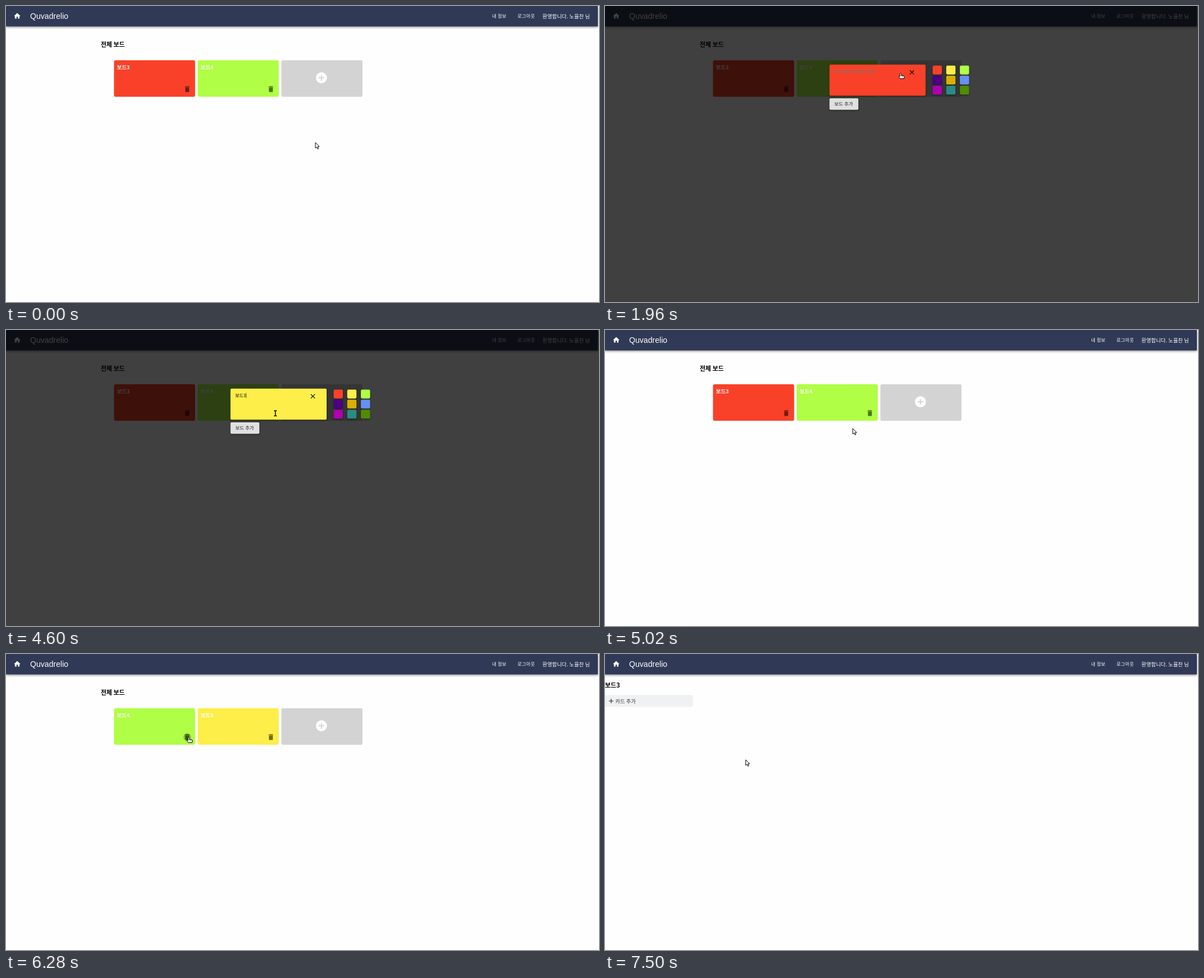
These frames come from a looping animation (1058 px wide and 529 px high, 7.52 s). An HTML page with a canvas:

```html
<!DOCTYPE html>
<html lang="ko">
<head>
<meta charset="utf-8">
<title>Boards</title>
<style>
html, body { margin: 0; width: 100%; height: 100%; overflow: hidden; background: #fefefe; }
canvas { display: block; width: 1058px; height: 529px; }
</style>
</head>
<body>
<canvas id="stage" width="1058" height="529"></canvas>
<script>
const ctx = document.getElementById('stage').getContext('2d');
const LOOP = 7520;
const KR = '"Noto Sans CJK KR", "Noto Sans CJK JP", "Noto Sans CJK", sans-serif';
const UNIT = 0.588; // page zoom

const RED = '#f94129', LIME = '#b0fe45', YELLOW = '#fdee49', GREY = '#d3d3d3';
const SWATCHES = [RED, YELLOW, LIME, '#4b0082', '#d9af02', '#6690f2', '#b000b0', '#288c84', '#4f8c00'];
const PANEL = [400.5, 104.7, 171.5, 55.5];
const ADD = [400.5, 165, 51.5, 20.5];

const ICONS = {
  home: 'M10 20v-6h4v6h5v-8h3L12 3 2 12h3v8z',
  trash: 'M6 19c0 1.1.9 2 2 2h8c1.1 0 2-.9 2-2V7H6v12zM19 4h-3.5l-1-1h-5l-1 1H5v2h14V4z',
  close: 'M19 6.41 17.59 5 12 10.59 6.41 5 5 6.41 10.59 12 5 17.59 6.41 19 12 13.41 17.59 19 19 17.59 13.41 12z',
  plus: 'M19 13h-6v6h-2v-6H5v-2h6V5h2v6h6v2z',
  addCircle: 'M12 2C6.48 2 2 6.48 2 12s4.48 10 10 10 10-4.48 10-10S17.52 2 12 2zm5 11h-4v4h-2v-4H7v-2h4V7h2v4h4v2z'
};
const CURSORS = {
  arrow: new Path2D('M0 0V10L2.4 8 4.1 11.6 5.7 10.9 4.1 7.4 7 7.2Z'),
  hand: new Path2D('M-1.2 1Q0-.8 1.2 1V4L6 5Q6.8 5.3 6.6 6.5L6 9.8H-.6L-3.4 6.5Q-3.6 5-1.2 6Z'),
  beam: new Path2D('M-2.5-4.6H-.8L0-4 .8-4.6H2.5M0-4V4M-2.5 4.6H-.8L0 4 .8 4.6H2.5')
};

// start, end, target x y, bend x y
const MOVES = [
  [20, 740, 237, 123, 480, 290],
  [800, 840, 236.5, 121.5, 236.7, 122],
  [1160, 1280, 527.5, 120, 380, 112],
  [2280, 2700, 617, 112, 580, 132],
  [3040, 3240, 523.5, 117.5, 570, 125],
  [4520, 4680, 442, 176, 480, 150],
  [5060, 5640, 326, 148.5, 350, 125],
  [6660, 7120, 380, 128, 340, 262],
  [7300, 7480, 251, 189, 330, 150]
];
const TYPED = [[3880, 'ㅂ'], [3960, '보'], [4060, '볻'], [4140, '보드'], [4320, '보드3']];

const clamp = v => Math.max(0, Math.min(1, v));
const smooth = v => v * v * (3 - 2 * v);
const ramp = (t, a, b) => smooth(clamp((t - a) / (b - a)));
const inside = (p, [x, y, w, h]) => p.x >= x && p.x <= x + w && p.y >= y && p.y <= y + h;
const cardRect = i => [192.7 + i * 149.3, 97, 144.7, 65.3];
const swatchRect = i => [584.5 + (i % 3) * 24.3, 106.6 + Math.floor(i / 3) * 17.9, 16.5, 15.8];

function box([x, y, w, h], r, fill, shadow) {
  ctx.save();
  if (shadow) {
    ctx.shadowColor = `rgba(0,0,0,${shadow})`;
    ctx.shadowBlur = 3;
    ctx.shadowOffsetY = 1.5;
  }
  ctx.fillStyle = fill;
  ctx.beginPath();
  ctx.roundRect(x, y, w, h, r);
  ctx.fill();
  ctx.restore();
}

function disc(x, y, r, fill) {
  ctx.fillStyle = fill;
  ctx.beginPath();
  ctx.arc(x, y, r, 0, Math.PI * 2);
  ctx.fill();
}

// cy is the visual middle of the line
function text(str, x, cy, size, color, { weight = 400, family = KR, spacing = 0 } = {}) {
  ctx.font = `${weight} ${size}px ${family}`;
  ctx.letterSpacing = spacing + 'px';
  ctx.fillStyle = color;
  ctx.fillText(str, x, cy + size * 0.37);
  return ctx.measureText(str).width;
}

function icon(name, cx, cy, color, scale = UNIT) {
  ctx.save();
  ctx.translate(cx, cy);
  ctx.scale(scale, scale);
  ctx.translate(-12, -12);
  ctx.fillStyle = color;
  ctx.fill(new Path2D(ICONS[name]));
  ctx.restore();
}

function pointerAt(t) {
  let x = 552, y = 244;
  for (const [a, b, tx, ty, bx, by] of MOVES) {
    if (t < a) break;
    const u = ramp(t, a, b), v = 1 - u;
    x = v * v * x + 2 * u * v * bx + u * u * tx;
    y = v * v * y + 2 * u * v * by + u * u * ty;
  }
  return { x, y };
}

function boardsAt(t) {
  const red = ['보드3', RED], lime = ['보드4', LIME], yellow = ['보드3', YELLOW];
  if (t < 5060) return [red, lime];
  return t < 6260 ? [red, lime, yellow] : [lime, yellow];
}

function cursorKind(t, p, cards) {
  if (t >= 7280) return t < 7320 ? 'hand' : 'arrow';
  if (t >= 1460 && t < 4740) {
    if (t < 2280) return 'hand';
    if (SWATCHES.some((_, i) => inside(p, swatchRect(i))) || inside(p, ADD)) return 'hand';
    return inside(p, PANEL) ? 'beam' : 'arrow';
  }
  for (let i = 0; i <= cards; i++) if (inside(p, cardRect(i))) return 'hand';
  return 'arrow';
}

function drawHeader() {
  ctx.save();
  ctx.shadowColor = 'rgba(0,0,0,.45)';
  ctx.shadowBlur = 4;
  ctx.shadowOffsetY = 1.5;
  ctx.fillStyle = '#303955';
  ctx.fillRect(0, 0, 1056, 36.5);
  ctx.restore();
  icon('home', 20, 17.9, '#fff');
  text('Quvadrelio', 43, 17.5, 14.1, '#fff', { family: '"Liberation Sans", Arial, sans-serif' });
  text('내 정보', 867.3, 18, 8.23, '#fff', { weight: 500, spacing: 0.235 });
  text('로그아웃', 912.5, 18, 8.23, '#fff', { weight: 500, spacing: 0.235 });
  text('환영합니다. 노율찬 님', 957, 18.5, 9.41, '#fff');
}

function drawBoards(t, p, boards) {
  text('전체 보드', 169, 68.5, 11, '#000', { weight: 700 });
  const live = t < 1460 || (t > 4920 && t < 6260) || t > 6660;
  for (let i = 0; i <= boards.length; i++) {
    const rect = cardRect(i), [x, y, w, h] = rect;
    if (i < boards.length) {
      const [name, color] = boards[i];
      box(rect, 3, color);
      text(name, x + 5.3, y + 12.4, 9.41, '#fff', { weight: 700 });
      if (i === 0 && t >= 6180 && t < 6520) {
        const grow = 3 + 3.7 * ramp(t, 6180, 6270);
        disc(x + 130.6, y + 51.5, grow, `rgba(0,0,0,${0.26 * (1 - ramp(t, 6320, 6520))})`);
      }
      icon('trash', x + 130.6, y + 51.5, 'rgba(0,0,0,.54)');
    } else {
      box(rect, 3, GREY);
      icon('addCircle', x + w / 2 - 0.9, y + 31.3, '#fff', 0.98);
    }
    if (live && inside(p, rect)) box(rect, 3, 'rgba(254,254,254,.3)');
  }
}

function drawTooltip() {
  box([241.5, 131, 31, 19], 0, '#d8d8d8', 0.4);
  box([242.5, 132, 29, 17], 0, '#000');
  text('보드3', 246.7, 140.7, 8.4, '#fff');
}

function drawModal(t, alpha) {
  ctx.save();
  ctx.globalAlpha = alpha;
  ctx.fillStyle = 'rgba(0,0,0,.75)';
  ctx.fillRect(0, 0, 1058, 529);

  box(PANEL, 2, t < 2860 ? RED : YELLOW, 0.3);
  let typed = '';
  for (const [at, str] of TYPED) if (t >= at) typed = str;
  let width = 0;
  if (typed) width = text(typed, 409, 117, 7.84, '#000');
  else text('보드명을 입력해주세요.', 409, 117, 7.84, '#757575');
  if (t >= 3440) {
    ctx.fillStyle = '#000';
    ctx.fillRect(409 + Math.round(width), 112.5, 0.6, 9);
  }
  icon('close', 547.5, 118.5, '#000');

  SWATCHES.forEach((color, i) => box(swatchRect(i), 2.3, color, 0.4));
  if (t >= 2860 && t < 3440) {
    const [x, y, w, h] = swatchRect(1);
    ctx.strokeStyle = 'rgba(150,165,200,.8)';
    ctx.lineWidth = 0.8;
    ctx.beginPath();
    ctx.roundRect(x, y, w, h, 2.3);
    ctx.stroke();
  }

  box(ADD, 2.3, '#e0e0e0', 0.4);
  text('보드 추가', 409.3, 175.4, 8.23, 'rgba(0,0,0,.87)', { weight: 500, spacing: 0.235 });
  ctx.restore();
}

function drawBoardPage() {
  text('보드3', 0, 56, 11, '#000', { weight: 700 });
  box([-4, 73.3, 161, 21.2], 3, '#f0f1f2');
  icon('plus', 11, 84, '#222');
  text('카드 추가', 18.3, 84.2, 9.41, '#333');
}

function drawCursor(kind, { x, y }) {
  ctx.save();
  ctx.translate(x, y);
  ctx.lineJoin = 'round';
  ctx.strokeStyle = '#000';
  if (kind === 'beam') {
    ctx.lineWidth = 1.5;
    ctx.stroke(CURSORS.beam);
  } else {
    ctx.lineWidth = 1;
    ctx.fillStyle = '#fff';
    ctx.fill(CURSORS[kind]);
    ctx.stroke(CURSORS[kind]);
  }
  if (kind === 'hand') {
    ctx.lineWidth = 0.5;
    ctx.stroke(new Path2D('M1.2 4V6M3 4.5V6M4.8 4.8V6'));
  }
  ctx.restore();
}

function draw(t) {
  const p = pointerAt(t), boards = boardsAt(t);
  ctx.fillStyle = '#fefefe';
  ctx.fillRect(0, 0, 1058, 529);
  drawHeader();
  if (t < 7280) drawBoards(t, p, boards);
  else drawBoardPage();
  if (t >= 1040 && t < 1160) drawTooltip();
  const alpha = ramp(t, 1460, 1700) * (1 - ramp(t, 4700, 4920));
  if (alpha > 0) drawModal(t, alpha);
  drawCursor(cursorKind(t, p, boards.length), p);
}

const start = performance.now();
function tick() {
  draw((performance.now() - start) % LOOP);
  requestAnimationFrame(tick);
}
tick();
</script>
</body>
</html>
```
